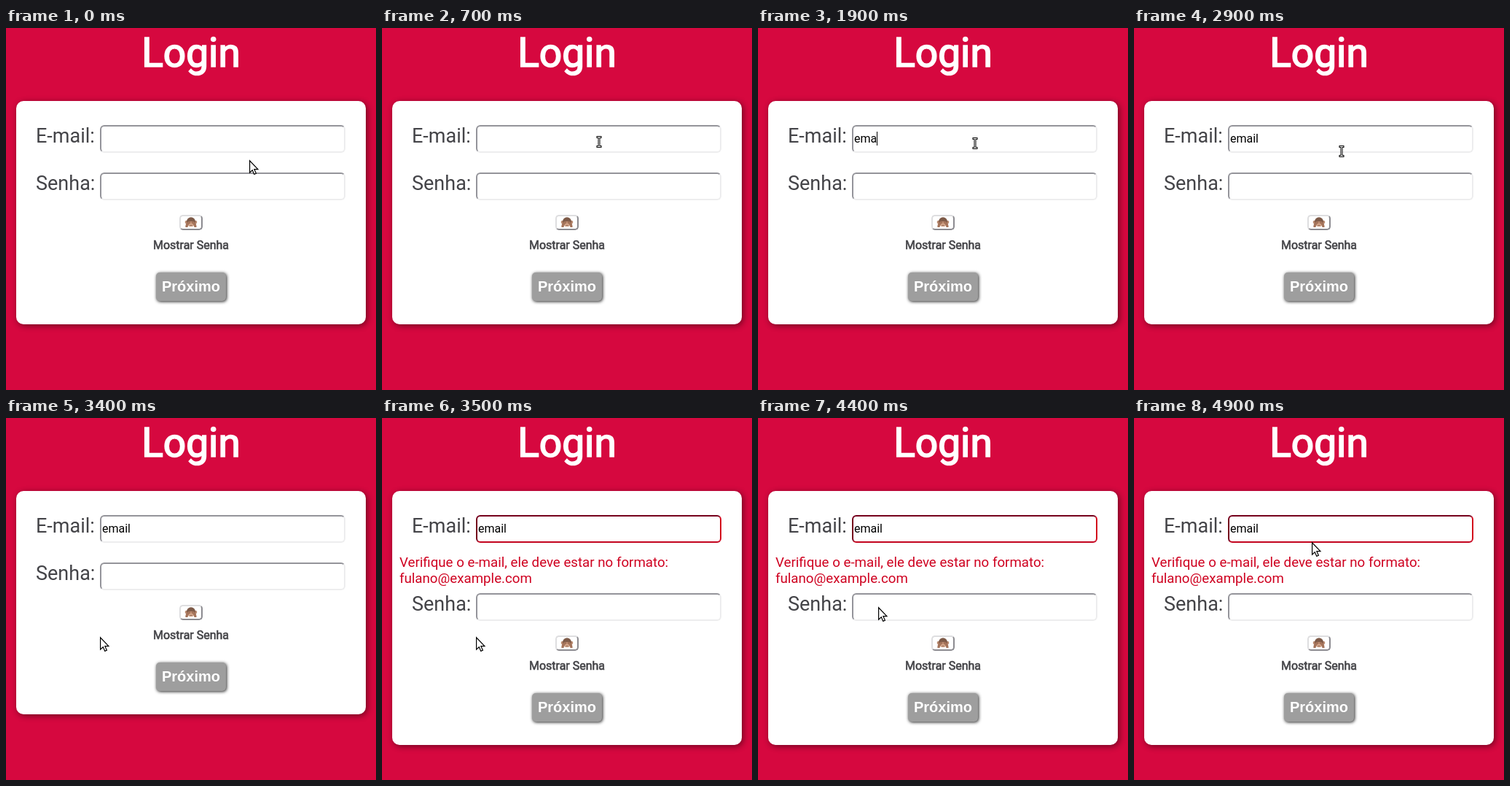
Write an HTML page that moves like this. It is 508 by 496 pixels and loops after 5 s.

```html
<!DOCTYPE html>
<html lang="pt-BR">
<head>
<meta charset="utf-8">
<title>Login</title>
<style>
html, body { margin: 0; width: 100%; height: 100%; overflow: hidden; }
#stage { position: relative; width: 508px; height: 496px; overflow: hidden; background: #d6083f; }
#stage div, #stage > svg { position: absolute; box-sizing: border-box; }
#stage > svg { left: 0; top: 0; }
#stage .low { transform: none; }
#stage.error .low { transform: translateY(42px); }
#card {
  left: 14px; top: 100px; width: 480px; height: 306px;
  border-radius: 10px; background: #fff; box-shadow: 2px 2px 9px rgba(0, 0, 0, .48);
}
.error #card { height: 348px; }
.field {
  left: 129px; width: 337px; height: 38px; border: 2px solid;
  border-color: #94949a #ededee #ededee #94949a; border-radius: 6px; background: #fff;
}
#email { top: 133px; }
#password { top: 198px; }
.error #email { border-color: #75001c #d3041c #c3041f #75001c; }
#eye {
  left: 238px; top: 256px; width: 32px; height: 21px; border: 2px solid;
  border-color: #dedee0 #8c8b90 #8c8b90 #dedee0; border-radius: 5px; background: #fff;
}
#next {
  left: 206px; top: 335px; width: 96px; height: 39px;
  border-radius: 5px; background: #9e9e9e; box-shadow: 1px 1px 4px #222;
}
text { font-family: Roboto, sans-serif; }
.label { font-size: 27px; fill: #444448; }
.typed { font-size: 16px; fill: #000; }
.warn { font-size: 18.72px; fill: #cf0220; }
.bold { stroke: currentColor; fill: currentColor; text-anchor: middle; }
#warning, #caret { visibility: hidden; }
.error #warning { visibility: visible; }
</style>
</head>
<body>
<div id="stage">
  <div id="card"></div>
  <div id="email" class="field"></div>
  <div id="password" class="field low"></div>
  <div id="eye" class="low"></div>
  <div id="next" class="low"></div>
  <svg width="508" height="496">
    <text class="bold" x="254" y="53" font-size="55" color="#fff" stroke-width="1.7">Login</text>
    <text class="label" x="41" y="157">E-mail:</text>
    <text class="typed" id="typed" x="132" y="157"></text>
    <rect id="caret" y="142" width="1" height="19"/>
    <g id="warning" class="warn">
      <text x="24" y="204">Verifique o e-mail, ele deve estar no formato:</text>
      <text x="24" y="226">fulano@example.com</text>
    </g>
    <g class="low">
      <text class="label" x="41" y="222">Senha:</text>
      <g id="monkey">
        <circle cx="248" cy="266" r="2.3" fill="#b98a70"/>
        <circle cx="260" cy="266" r="2.3" fill="#b98a70"/>
        <ellipse cx="254" cy="265.5" rx="6" ry="6.3" fill="#7d5a48"/>
        <ellipse cx="254" cy="268.6" rx="4.6" ry="3.6" fill="#d6a78b"/>
        <path d="M246.4 273c0-5 2-8.500 7-8.500l.2 3c-2.800.8-3.800 2.500-4 5.500zM261.600 273c0-5-2-8.500-7-8.500l-.2 3c2.800.8 3.800 2.500 4 5.500z" fill="#a4735a"/>
        <path d="M252.400 270.400h3.200" stroke="#7d5a48" stroke-width=".8"/>
      </g>
      <text class="bold" x="254" y="303" font-size="16" color="#434347" stroke-width=".6">Mostrar Senha</text>
      <text x="254" y="361" text-anchor="middle" fill="#fff"
        style="font: bold 20px 'Liberation Sans', Arial, sans-serif">Próximo</text>
    </g>
    <g id="cursor">
      <path id="arrow" d="M.6.800V17.200L4.300 13.700 6.800 19.400 9.400 18.300 6.900 12.700H11.900Z"
        fill="#fff" stroke="#000" stroke-width="1.2"/>
      <g id="beam" fill="none">
        <path d="M-3.500-6.500H3.500M0-6.500V6.500M-3.500 6.500H3.500" stroke="#000" stroke-width="3"/>
        <path d="M-2.500-6.500H2.500M0-6.500V6.500M-2.500 6.500H2.500" stroke="#fff" stroke-width="1"/>
      </g>
    </g>
  </svg>
</div>
<script>
const LOOP = 5000, STEP = 100, FIELD_BOTTOM = 171;
const $ = id => document.getElementById(id);

// Pointer stops: time, x, y
const stops = [
  [0, 334, 181], [600, 298, 156], [700, 298, 156], [900, 298, 158],
  [2800, 298, 158], [3400, 129, 300], [4100, 129, 300], [4900, 244, 170]
];
// Number of letters typed from each time on
const keys = [[1500, 1], [1700, 2], [1900, 3], [2100, 4], [2300, 5]];

const ease = p => p * p * (3 - 2 * p);
const show = (id, on) => { $(id).style.visibility = on ? 'visible' : 'hidden'; };

function pointer(t) {
  const i = stops.findIndex(s => s[0] > t);
  if (i < 0) return stops[stops.length - 1].slice(1);
  const [t0, x0, y0] = stops[i - 1], [t1, x1, y1] = stops[i];
  const p = ease((t - t0) / (t1 - t0));
  return [x0 + (x1 - x0) * p, y0 + (y1 - y0) * p].map(Math.round);
}

function draw(time) {
  const t = Math.floor(time % LOOP / STEP) * STEP;
  const [x, y] = pointer(t);
  const inField = y < FIELD_BOTTOM && t < 4000;
  $('cursor').setAttribute('transform', `translate(${x} ${y})`);
  show('arrow', !inField);
  show('beam', inField);

  const count = keys.filter(k => k[0] <= t).length;
  const typed = $('typed');
  typed.textContent = 'email'.slice(0, count);
  $('caret').setAttribute('x', Math.round(132 + (count ? typed.getComputedTextLength() : 0)));
  show('caret', t >= 1400 && t < 2900);
  $('stage').classList.toggle('error', t >= 3500);
}

const start = performance.now();
function tick() {
  draw(performance.now() - start);
  requestAnimationFrame(tick);
}
tick();
</script>
</body>
</html>
```
